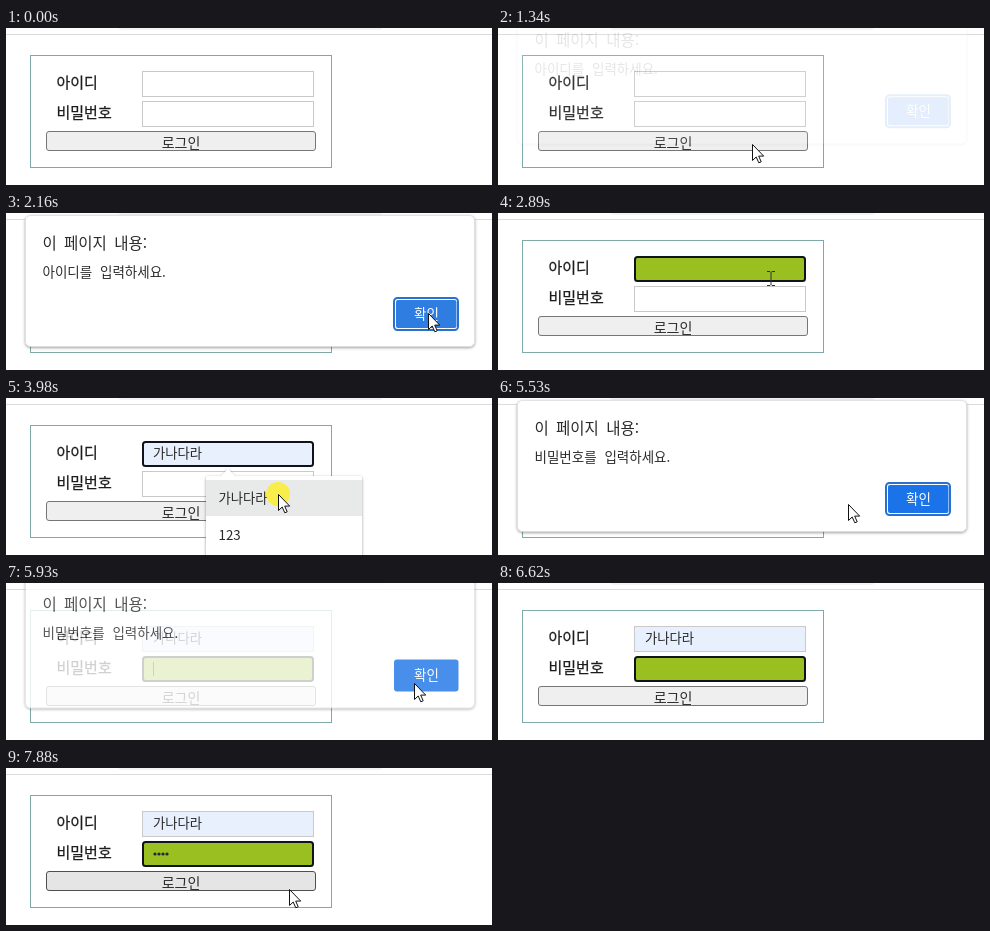
Animation of 486 by 157 pixels, one loop 8000 ms. Source, as an HTML page:

```html
<!DOCTYPE html>
<html lang="ko">
<head>
<meta charset="utf-8">
<style>
  html, body { margin: 0; width: 100%; height: 100%; overflow: hidden; background: #fff; }
  svg { display: block; width: 486px; height: 157px; }
  text {
    font-family: "Noto Sans CJK KR", "Noto Sans CJK", "Noto Sans", sans-serif;
    font-weight: 350; fill: #2a2a2a; white-space: pre;
  }
  .label { font-size: 15px; font-weight: 500; fill: #1c1c1c; stroke: #1c1c1c; stroke-width: .25; }
  .title { font-size: 15.5px; word-spacing: 3px; }
  .message { font-size: 13.5px; word-spacing: 4px; }
  .value { font-size: 13.333px; }
  .mid { text-anchor: middle; }
</style>
</head>
<body>
<svg viewBox="0 0 486 157">
  <defs>
    <filter id="shadow" x="-10%" y="-20%" width="120%" height="140%">
      <feDropShadow dx="0" dy="1" stdDeviation="1.6" flood-color="#000" flood-opacity=".4"/>
    </filter>
  </defs>
  <rect x="112" y="-6" width="265" height="8" rx="4" fill="#f1f3f4"/>
  <path d="M0 6.5H486" stroke="#dcdcdc"/>
  <rect x="24.5" y="27.5" width="301" height="112" fill="#fff" stroke="#7fa9a9"/>
  <text class="label" x="50.5" y="60">아이디</text>
  <text class="label" x="50.5" y="90">비밀번호</text>
  <rect id="idBox"/>
  <text id="idText" class="value" x="147" y="60">가나다라</text>
  <rect id="pwBox"/>
  <g id="dots" fill="#26263a"></g>
  <rect id="caret" width="1" height="14" fill="#111"/>
  <rect id="login" x="40.5" y="103.5" width="269" height="19" rx="2.5"/>
  <text class="mid" x="175" y="119.5" font-size="14">로그인</text>

  <g id="dropdown">
    <path d="M200 162V80q0-2 2-2H215l7-7 7 7H354q2 0 2 2V162Z" fill="#fff" filter="url(#shadow)"/>
    <rect id="option" x="200" y="82" width="156" height="36" fill="#e8e9e9"/>
    <text class="value" x="212.5" y="105">가나다라</text>
    <text class="value" x="212.5" y="141.5">123</text>
  </g>

  <g id="dialog">
    <rect x="19.5" y="2.5" width="449" height="131" rx="5" fill="#fff" stroke="#d4d4d4" stroke-width=".6" filter="url(#shadow)"/>
    <text class="title" x="36.5" y="35.5">이 페이지 내용:</text>
    <text id="message" class="message" x="36.5" y="64"></text>
    <rect id="ring" x="388" y="85" width="64" height="32" rx="3.5" fill="#fff" stroke="#2a70cf" stroke-width="2"/>
    <rect id="ok"/>
    <text class="mid" x="420.5" y="105.5" font-size="13.5" style="fill:#fff">확인</text>
  </g>

  <circle id="highlight" r="12" fill="#fbee22" opacity=".8"/>
  <g id="cursor">
    <path id="arrow" d="M.5 .5V16.5L4.2 13 6.8 18.8 9.2 17.8 6.7 12.1H11.7Z" fill="#fff" stroke="#111"/>
    <path id="beam" d="M-4 -6.5H-1L0 -5.5 1 -6.5H4M0 -5.5V6.5M-4 7.5H-1L0 6.5 1 7.5H4" fill="none" stroke="#333"/>
  </g>
</svg>
<script>
const LOOP = 8000, FRAME = 1000 / 15;
const MOVE = 400, PRESS = 130, BLINK = 525;
const FADE_IN = 290, FADE_OUT = 165;
const PASSWORD_LENGTH = 4, KEY_GAP = 140;
const GREEN = "#99bf21", AUTOFILL = "#e8f0fe";

// Where the pointer arrives, and when it clicks there.
const visits = {
  login: { x: 254, y: 116, arrive: 940, click: 980 },
  ok: { x: 422, y: 100, arrive: 2130, click: 2190 },
  field: { x: 273, y: 65, arrive: 2860, click: 3120 },
  option: { x: 272, y: 96, arrive: 3780, click: 3980 },
  loginAgain: { x: 254, y: 116, arrive: 4540, click: 4590 },
  okAgain: { x: 408, y: 100, arrive: 5700, click: 5770 },
  loginLast: { x: 283, y: 121, arrive: 7600, click: LOOP }
};
const { login, ok, field, option, loginAgain, okAgain } = visits;

const OPEN_DELAY = 320, CLOSE_DELAY = 130;
const dialog = (opener, closer, text) =>
  ({ open: opener.click + OPEN_DELAY, shut: closer.click + CLOSE_DELAY, text });
const dialogs = [
  dialog(login, ok, "아이디를 입력하세요."),
  dialog(loginAgain, okAgain, "비밀번호를 입력하세요.")
];
const idFocusAt = dialogs[0].shut, pwFocusAt = dialogs[1].shut;
const typingAt = 6920, lastKeyAt = typingAt + KEY_GAP * (PASSWORD_LENGTH - 1);
const pointerHidesAt = 6540, pointerReturnsAt = 7270;

const $ = id => document.getElementById(id);
const set = (id, attrs) => { for (const k in attrs) $(id).setAttribute(k, attrs[k]); };
const show = (id, on) => set(id, { visibility: on ? "visible" : "hidden" });
const clamp = (v, low = 0, high = 1) => Math.max(low, Math.min(high, v));
const between = (v, low, high) => v >= low && v < high;
const ease = p => p * p * (3 - 2 * p);

for (let i = 0; i < PASSWORD_LENGTH; i++) {
  const dot = document.createElementNS("http://www.w3.org/2000/svg", "circle");
  dot.setAttribute("cx", 149 + 4 * i);
  dot.setAttribute("cy", 86);
  dot.setAttribute("r", 1.6);
  $("dots").append(dot);
}

function pointerAt(t) {
  let x = 240, y = 156;
  if (t >= pointerReturnsAt) [x, y] = [381, 128];
  for (const stop of Object.values(visits)) {
    if (t >= pointerReturnsAt && stop !== visits.loginLast) continue;
    const p = ease(clamp((t - stop.arrive + MOVE) / MOVE));
    x += (stop.x - x) * p;
    y += (stop.y - y) * p;
  }
  return { x, y };
}

function drawInput(id, y, focused, fill) {
  const inset = focused ? 1 : .5;
  set(id, {
    x: 136 + inset, y: y + inset, width: 172 - 2 * inset, height: 26 - 2 * inset,
    rx: focused ? 2.5 : 0, fill,
    stroke: focused ? "#10131a" : "#c9c9c9", "stroke-width": focused ? 2 : 1
  });
}

function drawDialog(t, pointer) {
  const current = dialogs.find(d => between(t, d.open, d.shut + FADE_OUT));
  show("dialog", current);
  if (!current) return false;
  const closing = t >= current.shut;
  const alpha = closing ? 1 - (t - current.shut) / FADE_OUT : clamp((t - current.open) / FADE_IN);
  set("dialog", { opacity: alpha, transform: `translate(0 ${-19 * Math.sqrt(1 - alpha)})` });
  $("message").textContent = current.text;
  set("ring", { opacity: closing ? 0 : 1 });
  const inset = closing ? 0 : 2;
  set("ok", {
    x: 388 + inset, y: 85 + inset, width: 64.5 - 2 * inset, height: 32 - 2 * inset, rx: 3 - inset / 2,
    fill: pointer.x > 388 && !closing ? "#2f7de1" : "#1a73e8"
  });
  return true;
}

function drawCaret(t, typed, pwFocus) {
  let since = idFocusAt;
  if (t >= option.click + PRESS) since = option.click + PRESS;
  if (pwFocus) since = pwFocusAt;
  if (typed) since = Math.min(t, lastKeyAt);
  const focused = between(t, idFocusAt, loginAgain.click) || pwFocus;
  const previewing = between(t, option.arrive - MOVE / 2, option.click + PRESS);
  show("caret", focused && !previewing && (t - since) % (2 * BLINK) < BLINK);
  set("caret", {
    x: pwFocus ? 147 + 4 * typed : t > option.click ? 197 : 147,
    y: pwFocus ? 79 : 49
  });
}

function render(time) {
  const t = Math.round(time / FRAME) * FRAME;
  const pointer = pointerAt(t), { x, y } = pointer;
  const listOpen = between(t, field.click + PRESS / 2, option.click + PRESS);
  const filled = t >= option.arrive - MOVE / 3;
  const idFocus = between(t, idFocusAt, loginAgain.click);
  const pwFocus = t >= pwFocusAt;
  const typed = clamp(Math.floor((t - typingAt) / KEY_GAP) + 1, 0, PASSWORD_LENGTH);

  drawInput("idBox", 43, idFocus, filled ? AUTOFILL : idFocus ? GREEN : "#fff");
  drawInput("pwBox", 73, pwFocus, pwFocus ? GREEN : "#fff");
  show("idText", filled);
  [...$("dots").children].forEach((dot, i) => dot.setAttribute("visibility", i < typed ? "visible" : "hidden"));
  drawCaret(t, typed, pwFocus);

  show("dropdown", listOpen);
  show("option", listOpen && y > 82);
  const modal = drawDialog(t, pointer);

  const pointerVisible = between(t, 720, pointerHidesAt) || t >= pointerReturnsAt;
  const hover = pointerVisible && !modal && between(x, 40, 310) && between(y, 103, 123);
  set("login", { fill: hover ? "#e5e5e5" : "#efefef", stroke: hover ? "#4f4f4f" : "#767676" });

  const inField = between(x, 136, 308) && (between(y, 43, 69) || between(y, 73, 99));
  const beam = inField && !modal && !(listOpen && y > 78);
  set("cursor", { transform: `translate(${Math.round(x)} ${Math.round(y)})` });
  show("arrow", pointerVisible && !beam);
  show("beam", pointerVisible && beam);
  set("highlight", { cx: x, cy: y });
  show("highlight", Object.values(visits).some(v => between(t, v.click, v.click + PRESS)));
}

const began = performance.now();
function tick() {
  render((performance.now() - began) % LOOP);
  requestAnimationFrame(tick);
}
tick();
</script>
</body>
</html>
```
